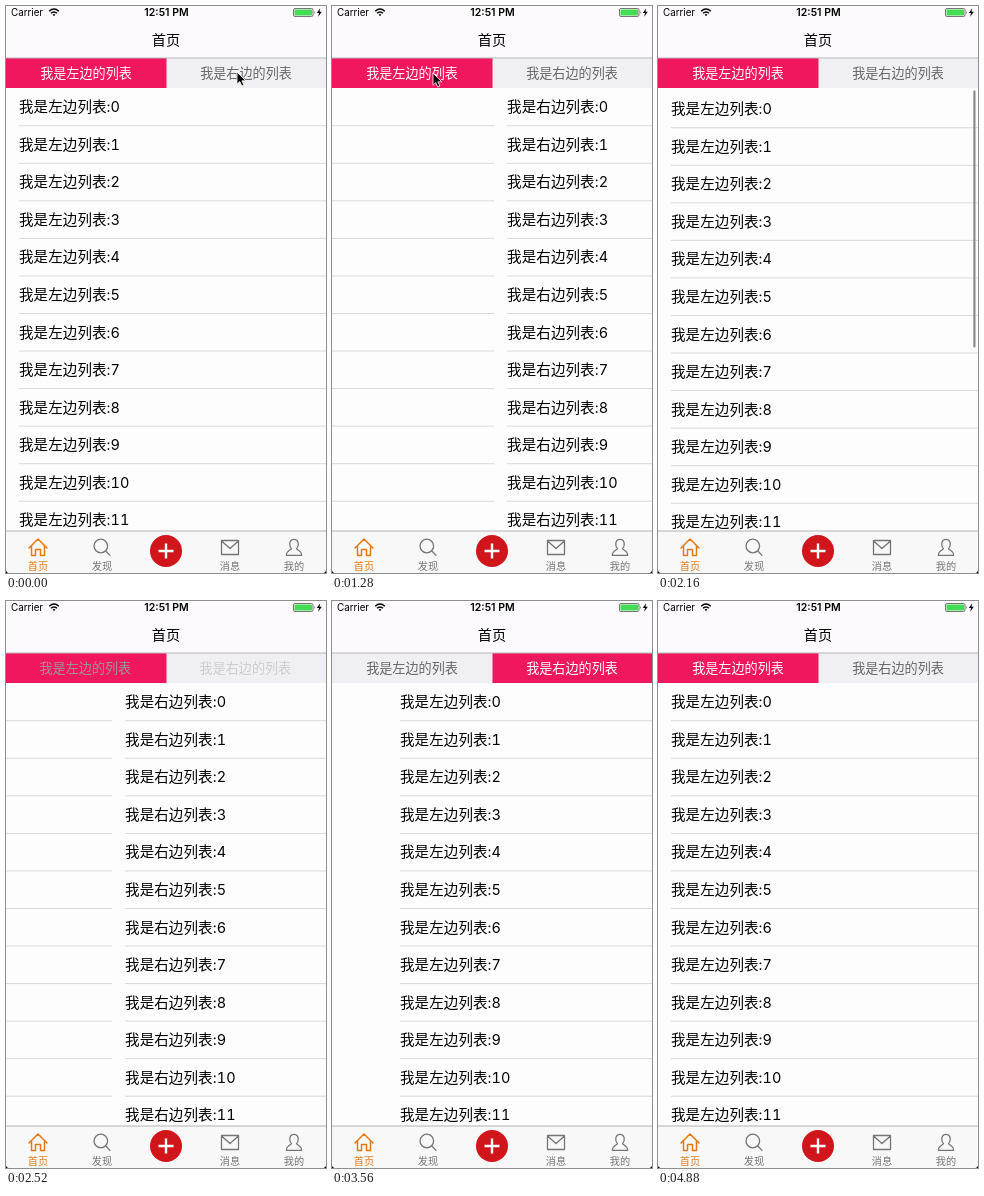
Animation, 320 px wide and 567 px high, one loop 4.92 s. Source, as an HTML page:

```html
<!DOCTYPE html>
<html lang="zh-CN">
<head>
<meta charset="utf-8">
<title>首页</title>
<style>
html, body { margin: 0; width: 100%; height: 100%; overflow: hidden; background: #000; }
svg { display: block; width: 320px; height: 567px; }
text { font-family: Inter, "Noto Sans CJK SC", "Noto Sans CJK", sans-serif; }
.mid { text-anchor: middle; }
.row { font-size: 14.5px; letter-spacing: .1px; font-variant-numeric: tabular-nums; fill: #000; }
.tab { font-size: 13.1px; }
.title { font-size: 14.2px; font-weight: 500; }
.status { font-size: 9.8px; }
.time { font-size: 10.5px; font-weight: 600; }
.label { font-size: 10.2px; font-weight: 500; }
.icon { fill: none; stroke: #757575; stroke-width: 1.3; stroke-linejoin: round; stroke-linecap: round; }
.icon.on { stroke: #e47a14; stroke-width: 1.5; }
</style>
</head>
<body>
<svg viewBox="0 0 320 567">
  <defs>
    <clipPath id="screen"><path d="M0 0H320V563Q320 567 316 567H4Q0 567 0 563Z"/></clipPath>
    <clipPath id="view"><rect y="82" width="320" height="443"/></clipPath>
  </defs>
  <g clip-path="url(#screen)">
    <rect width="320" height="567" fill="#fdfdfd"/>
    <g clip-path="url(#view)">
      <g id="pager">
        <g id="left"></g>
        <g id="right" transform="translate(320 0)"></g>
        <rect id="bar" x="315.3" y="84.5" width="2.2" rx="1.1" fill="#8a8a8a"/>
      </g>
    </g>

    <rect width="320" height="52" fill="#fcfafc"/>
    <text class="status" x="5" y="10">Carrier</text>
    <g fill="none" stroke="#000" stroke-width="1.5">
      <path d="M43.2 5.2Q48 .9 52.8 5.2M45 7.3Q48 4.6 51 7.3"/>
      <path d="M46.6 8.6Q48 7.5 49.4 8.6L48 10.2Z" fill="#000" stroke="none"/>
    </g>
    <text class="time mid" x="160.5" y="10">12:51 PM</text>
    <rect x="287.5" y="2.5" width="19.5" height="8" rx="1.5" fill="none" stroke="#555" stroke-width=".8"/>
    <rect x="288.5" y="3.5" width="17.5" height="6" rx=".6" fill="#45dc55"/>
    <path d="M308 5Q309.5 6.5 308 8Z" fill="#555"/>
    <path d="M314.2 2.2L310.8 7H313L312.2 10.8L315.8 5.8H313.5Z"/>
    <text class="title mid" x="160" y="38.5">首页</text>

    <rect y="52" width="320" height="30" fill="#f0eff3"/>
    <rect id="mark" y="52" width="160.5" height="30" fill="#f0175f"/>
    <rect y="51.5" width="320" height="1" fill="#b8b7ba"/>
    <text id="tabL" class="tab mid" x="80" y="72">我是左边的列表</text>
    <text id="tabR" class="tab mid" x="240" y="72">我是右边的列表</text>

    <rect y="525" width="320" height="42" fill="#f8f8f8"/>
    <rect y="524.5" width="320" height="1" fill="#b4b4b4"/>
    <path class="icon on" d="M23 542L32 533L41 542M25.5 540V549.5H29.5V543.5H34.5V549.5H38.5V540"/>
    <g class="icon">
      <circle cx="94.8" cy="540" r="6.8"/>
      <path d="M99.8 545L104 549.4"/>
      <path d="M215.5 534.5H232.5V548.5H215.5ZM215.5 535L224 542.5L232.5 535"/>
      <path d="M285.4 542.6C282.6 539.6 283.2 533.4 288 533.4S293.4 539.6 290.6 542.6C291 544.4 295.4 544 295.6 549.4H280.4C280.6 544 285 544.4 285.4 542.6Z"/>
    </g>
    <circle cx="160" cy="545" r="16" fill="#d0151b"/>
    <path d="M152.5 545H167.5M160 537.5V552.5" stroke="#fff" stroke-width="2.4"/>
    <g class="label mid" fill="#757575">
      <text x="32" y="563.6" fill="#e47a14">首页</text>
      <text x="96" y="563.6">发现</text>
      <text x="224" y="563.6">消息</text>
      <text x="288" y="563.6">我的</text>
    </g>
    <path id="cursor" d="M0 0V12.2L2.8 9.6L4.8 14L6.9 13L4.9 8.8H8.8Z" stroke="#fff" stroke-width=".8"/>
  </g>
</svg>
<script>
const LOOP = 4920, ROW = 37.547, TOP = 82, ROWS = 20;
const el = id => document.getElementById(id);

const eases = {
  line: u => u,
  soft: u => (1 - Math.cos(Math.PI * u)) / 2,
  out: u => 1 - (1 - u) ** 2,
  settle: u => 1 - (1 - u) ** 3
};

// Each step: time, value, easing used to arrive there
const pageX = [[440, 0], [680, -320, 'soft'], [1160, -320], [1400, 0, 'soft'],
  [2320, 0], [2440, -110], [2720, -320, 'out'],
  [3080, -320], [3280, -150, 'soft'], [3440, 0], [3560, 55, 'out'], [3840, 0, 'soft']];
const pullY = [[1800, 0], [1960, 45, 'out'], [2160, 2, 'settle'], [2240, 0]];
const barAlpha = [[1800, 0], [1840, 1], [2200, 1], [2320, 0]];
const cursorX = [[720, 231], [1040, 101, 'soft'], [1400, 101], [1680, 227, 'soft']];
const cursorY = [[720, 66], [1040, 67, 'soft'], [1400, 67], [1680, 184, 'soft']];

function track(steps, t) {
  const i = steps.findIndex(s => s[0] > t);
  if (i === 0) return steps[0][1];
  if (i < 0) return steps[steps.length - 1][1];
  const [t0, a] = steps[i - 1], [t1, b, ease = 'line'] = steps[i];
  return a + (b - a) * eases[ease]((t - t0) / (t1 - t0));
}

function fillList(id, name) {
  let out = '';
  for (let i = 0; i < ROWS; i++) {
    const y = TOP + i * ROW;
    out += `<text class="row" x="13" y="${(y + 24.3).toFixed(2)}">${name}:${i}</text>` +
      `<rect x="13" y="${(y + ROW - .3).toFixed(2)}" width="307" height="1" fill="#d9d8dc"/>`;
  }
  el(id).innerHTML = out;
}

function tabText(id, on, shift) {
  const v = Math.round(102 + 153 * on);
  el(id).setAttribute('fill', `rgb(${v},${v},${v})`);
  el(id).setAttribute('transform', `translate(${-shift} 0)`);
}

function draw(t) {
  const x = track(pageX, t), y = track(pullY, t);
  el('pager').setAttribute('transform', `translate(${x.toFixed(2)} 0)`);
  el('left').setAttribute('transform', `translate(0 ${y.toFixed(2)})`);
  el('bar').setAttribute('height', 259 - y);
  el('bar').setAttribute('opacity', track(barAlpha, t));

  // A swipe blends the tab text first; the marker jumps once the page rests
  const right = (t >= 480 && t < 1200) || (t >= 2760 && t < 3880);
  const swiping = t >= 2320 && t < 2760;
  const on = swiping ? -x / 320 : +right;
  el('mark').setAttribute('x', right ? 160.5 : 0);
  tabText('tabL', 1 - on, swiping ? on : 0);
  tabText('tabR', on, swiping ? on : 0);

  el('cursor').setAttribute('transform', `translate(${track(cursorX, t)} ${track(cursorY, t)})`);
  el('cursor').setAttribute('visibility', t < 1840 ? 'visible' : 'hidden');
}

fillList('left', '我是左边列表');
fillList('right', '我是右边列表');

const start = performance.now();
function tick() {
  draw((performance.now() - start) % LOOP);
  requestAnimationFrame(tick);
}
tick();
</script>
</body>
</html>
```
